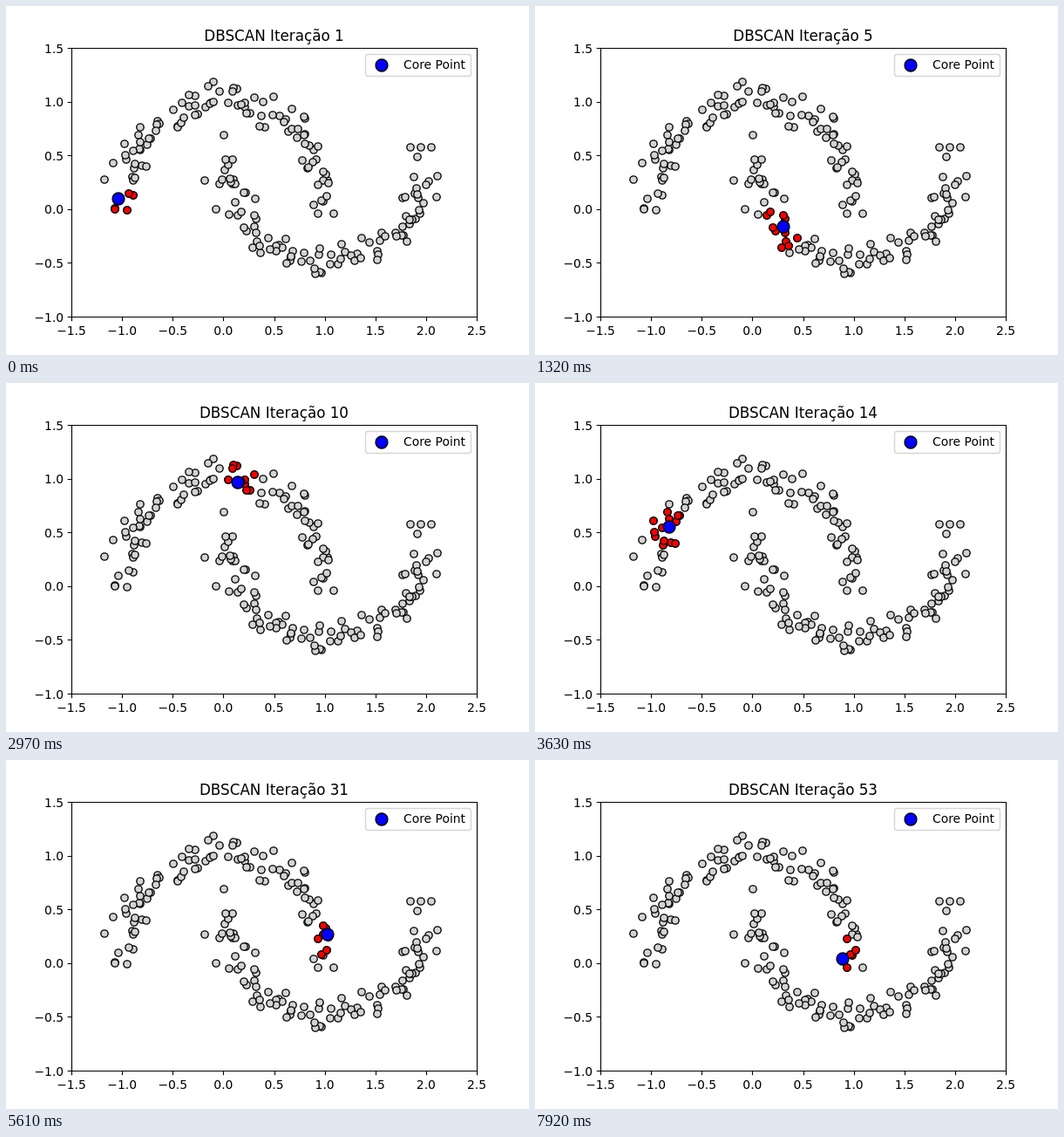
Recreate the animation shown at these times as an HTML page. Size 600x400 px, loop 8000 ms.

```html
<!DOCTYPE html>
<html lang="pt">
<head>
<meta charset="utf-8">
<style>
  html, body { margin: 0; width: 100%; height: 100%; overflow: hidden; background: #fff; }
  svg { display: block; width: 600px; height: 400px; }
  text { font: 13.889px "DejaVu Sans", sans-serif; }
  .title { font-size: 16.75px; }
  .end { text-anchor: end; }
  .mid { text-anchor: middle; }
  .axis { fill: none; stroke: #000; stroke-width: 1.11; }
  .dot { stroke: #000; stroke-width: 1.389; }
</style>
</head>
<body>
<svg id="stage" viewBox="0 0 600 400"></svg>
<script>
const LOOP = 8000, STEP = 330;
const COUNT = 200, NOISE = 0.08, EPS = 0.2, MIN_POINTS = 5;

// Mersenne Twister (MT19937)
function twister(seed) {
  const N = 624, state = new Uint32Array(N);
  let pos = N;
  state[0] = seed;
  for (let i = 1; i < N; i++) {
    const prev = state[i - 1] ^ (state[i - 1] >>> 30);
    state[i] = Math.imul(1812433253, prev) + i;
  }
  const refill = () => {
    for (let i = 0; i < N; i++) {
      const y = (state[i] & 0x80000000) | (state[(i + 1) % N] & 0x7fffffff);
      state[i] = state[(i + 397) % N] ^ (y >>> 1) ^ (y & 1 ? 0x9908b0df : 0);
    }
    pos = 0;
  };
  return () => {
    if (pos === N) refill();
    let y = state[pos++];
    y ^= y >>> 11;
    y ^= (y << 7) & 0x9d2c5680;
    y ^= (y << 15) & 0xefc60000;
    return (y ^ (y >>> 18)) >>> 0;
  };
}

const next = twister(42);
const uniform = () => ((next() >>> 5) * 67108864 + (next() >>> 6)) / 9007199254740992;

let spare = null;
function gauss() {
  if (spare !== null) {
    const value = spare;
    spare = null;
    return value;
  }
  let a, b, r;
  do {
    a = 2 * uniform() - 1;
    b = 2 * uniform() - 1;
    r = a * a + b * b;
  } while (r >= 1 || r === 0);
  const f = Math.sqrt(-2 * Math.log(r) / r);
  spare = f * a;
  return f * b;
}

function below(max) {
  const mask = 2 ** (32 - Math.clz32(max)) - 1;
  let value;
  do value = next() & mask; while (value > max);
  return value;
}

// Two interleaved half circles, shuffled, then blurred
function moons() {
  const half = COUNT / 2;
  const order = Array.from({ length: COUNT }, (_, i) => i);
  for (let i = COUNT - 1; i > 0; i--) {
    const j = below(i);
    [order[i], order[j]] = [order[j], order[i]];
  }
  return order.map(k => {
    const t = Math.PI * (k % half) / (half - 1);
    const [x, y] = k < half
      ? [Math.cos(t), Math.sin(t)]
      : [1 - Math.cos(t), 0.5 - Math.sin(t)];
    return [x + NOISE * gauss(), y + NOISE * gauss()];
  });
}

// Each unvisited point with enough neighbours becomes one step
function clusterSteps(points) {
  const visited = new Set(), steps = [];
  points.forEach((p, i) => {
    if (visited.has(i)) return;
    visited.add(i);
    const near = [...points.keys()].filter(j =>
      Math.hypot(points[j][0] - p[0], points[j][1] - p[1]) <= EPS);
    if (near.length < MIN_POINTS) return;
    near.forEach(j => visited.add(j));
    steps.push({ core: i, near });
  });
  return steps;
}

const stage = document.getElementById("stage");
const px = x => 75 + (x + 1.5) * 116.25;
const py = y => 356 - (y + 1) * 123.2;

function add(parent, tag, attrs, text = "") {
  const el = document.createElementNS("http://www.w3.org/2000/svg", tag);
  for (const key in attrs) el.setAttribute(key, attrs[key]);
  el.textContent = text;
  return parent.appendChild(el);
}
const dot = (parent, [x, y], fill, r = 4.167) => add(parent, "circle",
  { class: "dot", cx: Math.round(px(x)), cy: Math.round(py(y)), r, fill });

const points = moons();
const steps = clusterSteps(points);

const base = add(stage, "g", {});
const marks = add(stage, "g", {});
points.forEach(p => dot(base, p, "lightgray"));

const label = v => v.toFixed(1).replace("-", "\u2212");
let ticks = "";
for (let v = -1.5; v <= 2.5; v += 0.5) {
  const x = px(v);
  ticks += `M${Math.round(x) + 0.5} 356.5v4.86`;
  add(stage, "text", { class: "mid", x, y: 377 }, label(v));
}
for (let v = -1; v <= 1.5; v += 0.5) {
  const y = py(v);
  ticks += `M75.5 ${Math.round(y) + 0.5}h-4.86`;
  add(stage, "text", { class: "end", x: 66.2, y: Math.round(y + 5.5) }, label(v));
}
add(stage, "path", { class: "axis", d: "M75.5 48.5H540.5V356.5H75.5Z" + ticks });

add(stage, "rect", { x: 412.5, y: 55.5, width: 121, height: 25, rx: 2.8,
  fill: "#fff", "fill-opacity": 0.8, stroke: "#ccc", "stroke-opacity": 0.8, "stroke-width": 1.39 });
add(stage, "circle", { class: "dot", cx: 431, cy: 68, r: 6.944, fill: "blue" });
add(stage, "text", { x: 456, y: 72 }, "Core Point");
const title = add(stage, "text", { class: "title mid", x: 307.5, y: 40 });

let shown = -1;
function show(index) {
  if (index === shown) return;
  shown = index;
  const { core, near } = steps[index];
  marks.replaceChildren();
  near.forEach(j => dot(marks, points[j], "red"));
  dot(marks, points[core], "blue", 6.944);
  title.textContent = `DBSCAN Iteração ${core + 1}`;
}

const start = performance.now();
function tick() {
  show(Math.floor((performance.now() - start) % LOOP / STEP));
  requestAnimationFrame(tick);
}
tick();
</script>
</body>
</html>
```
